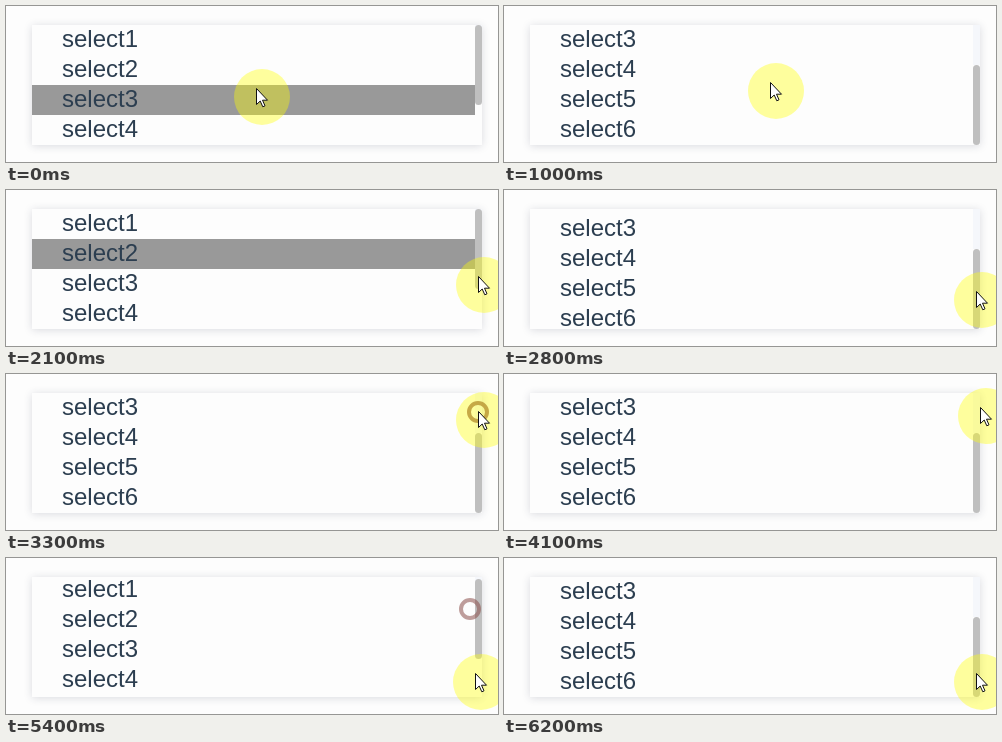
Recreate the animation shown at these times as an HTML page. Size 492 by 156 pixels, loop 7500 ms.

```html
<!DOCTYPE html>
<html lang="en">
<head>
<meta charset="utf-8">
<title>Scrolling list</title>
<style>
  html, body { margin: 0; width: 100%; height: 100%; overflow: hidden; background: #fdfdfd; }
  #stage { position: relative; width: 492px; height: 156px; overflow: hidden; background: #fdfdfd; }
  #panel {
    position: absolute; left: 26px; top: 19px; width: 450px; height: 120px;
    overflow: hidden; background: #fdfdfd; box-shadow: 0 1px 8px rgba(40, 50, 80, .17);
  }
  #track { position: absolute; right: 0; top: 0; width: 7px; height: 40px; background: #f5f7fb; }
  #list { width: 443px; font: 24px/28px Arial, "Liberation Sans", sans-serif; color: #2c3e50; }
  #list div { height: 30px; padding-left: 30px; }
  #list .hover { background: #999; }
  #thumb { position: absolute; right: 0; top: 0; width: 7px; height: 80px; border-radius: 4px; background: #bfbfbf; }
  #ring, #halo, #cursor { position: absolute; left: 0; top: 0; }
  #ring { width: 14px; height: 14px; margin: -10px 0 0 -11px; border: 4px solid #874a46; border-radius: 50%; }
  #halo { width: 56px; height: 56px; margin: -19px 0 0 -22px; border-radius: 50%; background: rgba(255, 255, 0, .38); }
</style>
</head>
<body>
<div id="stage">
  <div id="panel">
    <div id="track"></div>
    <div id="list"></div>
    <div id="thumb"></div>
  </div>
  <div id="ring"></div>
  <div id="halo"></div>
  <svg id="cursor" width="14" height="21">
    <path d="M.5 .5V16.5L4.2 13L6.8 18.8L9 17.8L6.5 12.2H11.5Z" fill="#fff" stroke="#111"/>
  </svg>
</div>
<script>
const LOOP = 7500, STEP = 100, MAX = 60;
// From PAGING on, the pointer clicks low and high on the track once per CYCLE.
const PAGING = 2500, CYCLE = 1000, LAST = 3;
const HIGH_CLICK = 700, RELEASE = 800;

const home = [250, 82], rest = [266, 76], edge = [472, 86], end = [472, 115];
const lows = [[472, 101], [474, 107], [478, 108], [469, 115]];
const highs = [[472, 37], [476, 29], [464, 50]];

const $ = id => document.getElementById(id);
const place = (el, [x, y]) => { el.style.transform = `translate(${x}px, ${y}px)`; };

const ramp = (t, start, length) => Math.min(1, Math.max(0, (t - start) / length));
const easeOut = u => 1 - (1 - u) ** 2;
const smooth = u => u * u * (3 - 2 * u);

function glide(a, b, t, start, length) {
  const u = smooth(ramp(t, start, length));
  return a.map((v, i) => Math.round(v + (b[i] - v) * u));
}

function paging(t) {
  const k = Math.min(LAST, Math.floor((t - PAGING) / CYCLE));
  return { k, p: t - PAGING - k * CYCLE };
}

function pointerAt(t) {
  if (t < 1400) return glide(home, rest, t, 100, 600);
  if (t < 2100) return glide(rest, edge, t, 1400, 700);
  if (t < PAGING) return glide(edge, lows[0], t, 2100, 300);
  const { k, p } = paging(t);
  if (k === LAST) return glide(lows[k], end, p, 300, 400);
  return p < RELEASE
    ? glide(lows[k], highs[k], p, 300, 350)
    : glide(highs[k], lows[k + 1], p, RELEASE, 100);
}

function scrollAt(t) {
  if (t < PAGING) return MAX * (ramp(t, 100, 500) - ramp(t, 1000, 300));
  const { k, p } = paging(t);
  const up = k < LAST ? easeOut(ramp(p, RELEASE, 120)) : 0;
  return MAX * (easeOut(ramp(p, 0, 420)) - up);
}

const rows = Array.from({ length: 6 }, (_, i) => {
  const row = document.createElement("div");
  row.textContent = "select" + (i + 1);
  $("list").append(row);
  return row;
});

function draw(t) {
  const scroll = Math.round(scrollAt(t));
  const active = t >= PAGING;
  const { k, p } = paging(t);

  // a low click moves the thumb at once, and the list follows
  const thumb = active && p > 0 && p <= RELEASE ? MAX : scroll;
  place($("list"), [0, -scroll]);
  place($("thumb"), [0, Math.ceil(thumb * 2 / 3)]);

  const hover = active || scroll ? -1 : t < 1000 ? 2 : 1;
  rows.forEach((row, i) => row.classList.toggle("hover", i === hover));

  const tip = pointerAt(t);
  place($("halo"), tip);
  place($("cursor"), tip);

  const ringed = active && k < LAST && p >= HIGH_CLICK;
  $("ring").style.opacity = ringed ? 1 - (p - HIGH_CLICK) / 430 : 0;
  if (ringed) place($("ring"), highs[k]);
}

const start = performance.now();
function tick() {
  const t = (performance.now() - start) % LOOP;
  draw(Math.floor(t / STEP) * STEP);
  requestAnimationFrame(tick);
}
tick();
</script>
</body>
</html>
```
